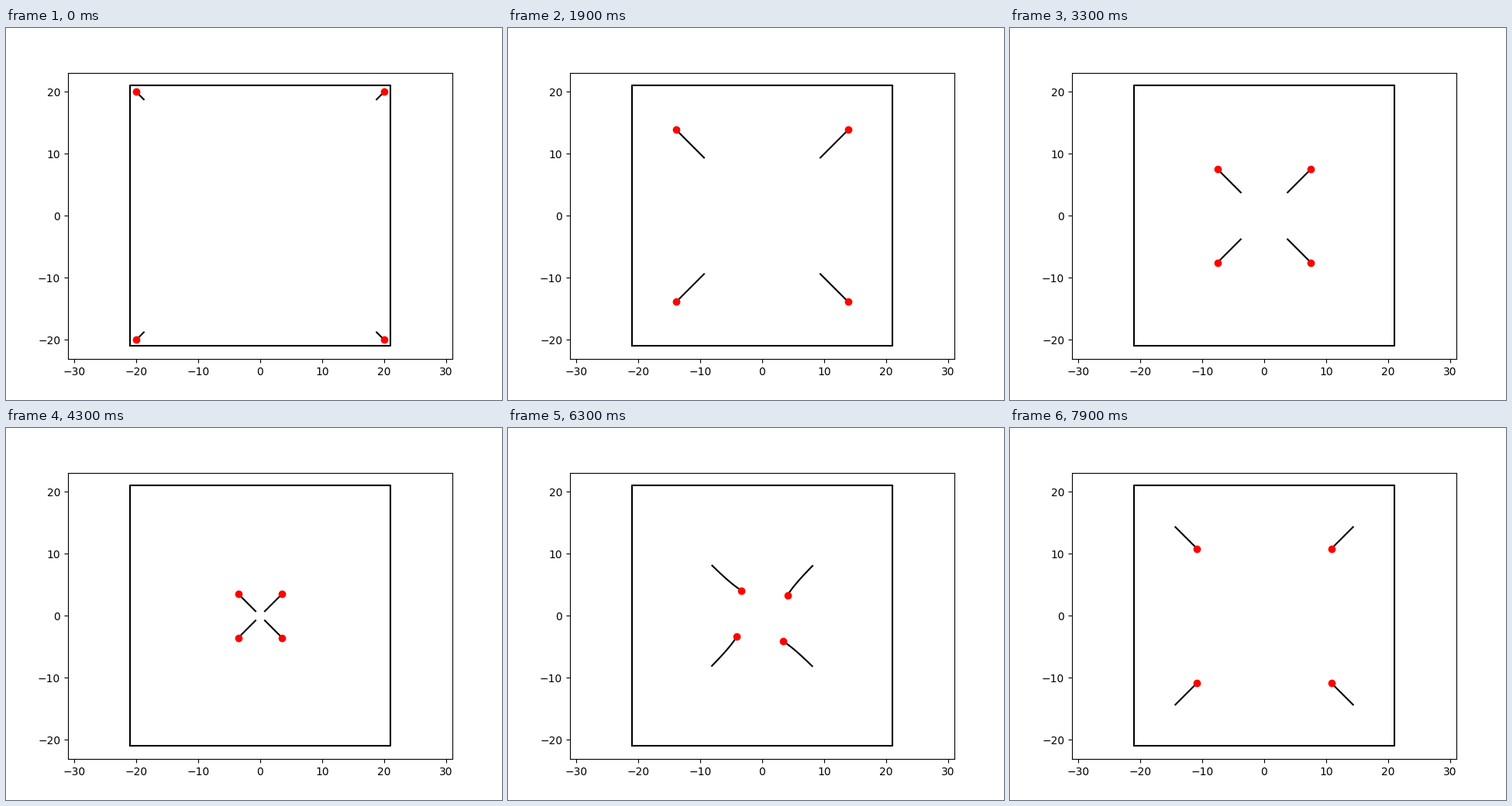
A matplotlib script for the animation above (8000 ms loop, 640 px wide and 480 px high).

```python
import numpy as np
import matplotlib.pyplot as plt
from matplotlib.animation import FuncAnimation

FRAMES, STEP = 80, 0.1
HORIZON = np.arange(10) * STEP
HEADING = -1 + 1j
MEET = 4.3  # time at which the agents start to give way

# Speed along the diagonal: pull away, coast, brake at the centre, speed up.
CLOCK = np.linspace(0, 9, 901)
SPEED = np.interp(CLOCK, [0, 1.36, MEET, 5, 6.5, 7.2],
                  [0, 5.05, 3.8, 2.56, 5.56, 3.9])
TRAVEL = np.cumsum(SPEED) * (CLOCK[1] - CLOCK[0]) - 20


def ease(t):
    """Smooth change from 0 to 1 while the agents give way."""
    u = np.clip((t - MEET) / 0.8, 0, 1)
    return u * u * (3 - 2 * u)


def along(t):
    return np.interp(t, CLOCK, TRAVEL)


def position(t):
    """Place on the diagonal plus a sideways bulge around the centre."""
    s = along(t)
    bulge = 1.41 / np.cosh((s - 0.625) / 1.54) * ease(t)
    return HEADING * (s - 1j * bulge)


def reach(t):
    """Length of the straight plan, which stops short of the centre."""
    speed = min(1.36 + 3.71 * t, 6.09 - 0.575 * t)
    return max(0, min(speed * HORIZON[-1], -along(t) - 0.75))


def plan(t):
    """Planned path: straight ahead at first, later along the swerve."""
    straight = position(t) + HEADING * reach(t) * HORIZON / HORIZON[-1]
    w = ease(t)
    return (1 - w) * straight + w * position(t + HORIZON)


fig = plt.figure(figsize=(6.4, 4.8), dpi=100)
ax = fig.add_subplot()
ax.set_xlim(-31, 31)
ax.set_ylim(-23.1, 23.1)
ax.set_xticks(range(-30, 31, 10))
ax.set_yticks(range(-20, 21, 10))

ax.plot([-21, 21, 21, -21, -21], [-21, -21, 21, 21, -21], "k", lw=1.5)
plans = [ax.plot([], [], "k", lw=1.5)[0] for _ in range(4)]
dots = [ax.plot([], [], "ro", ms=6)[0] for _ in range(4)]


def update(frame):
    path = plan(frame * STEP)
    for k, (line, dot) in enumerate(zip(plans, dots)):
        z = path * 1j ** k
        line.set_data(z.real, z.imag)
        dot.set_data(z.real[:1], z.imag[:1])
    return plans + dots


anim = FuncAnimation(fig, update, frames=FRAMES, interval=1000 * STEP,
                     repeat=True, repeat_delay=0)
plt.show()
```
